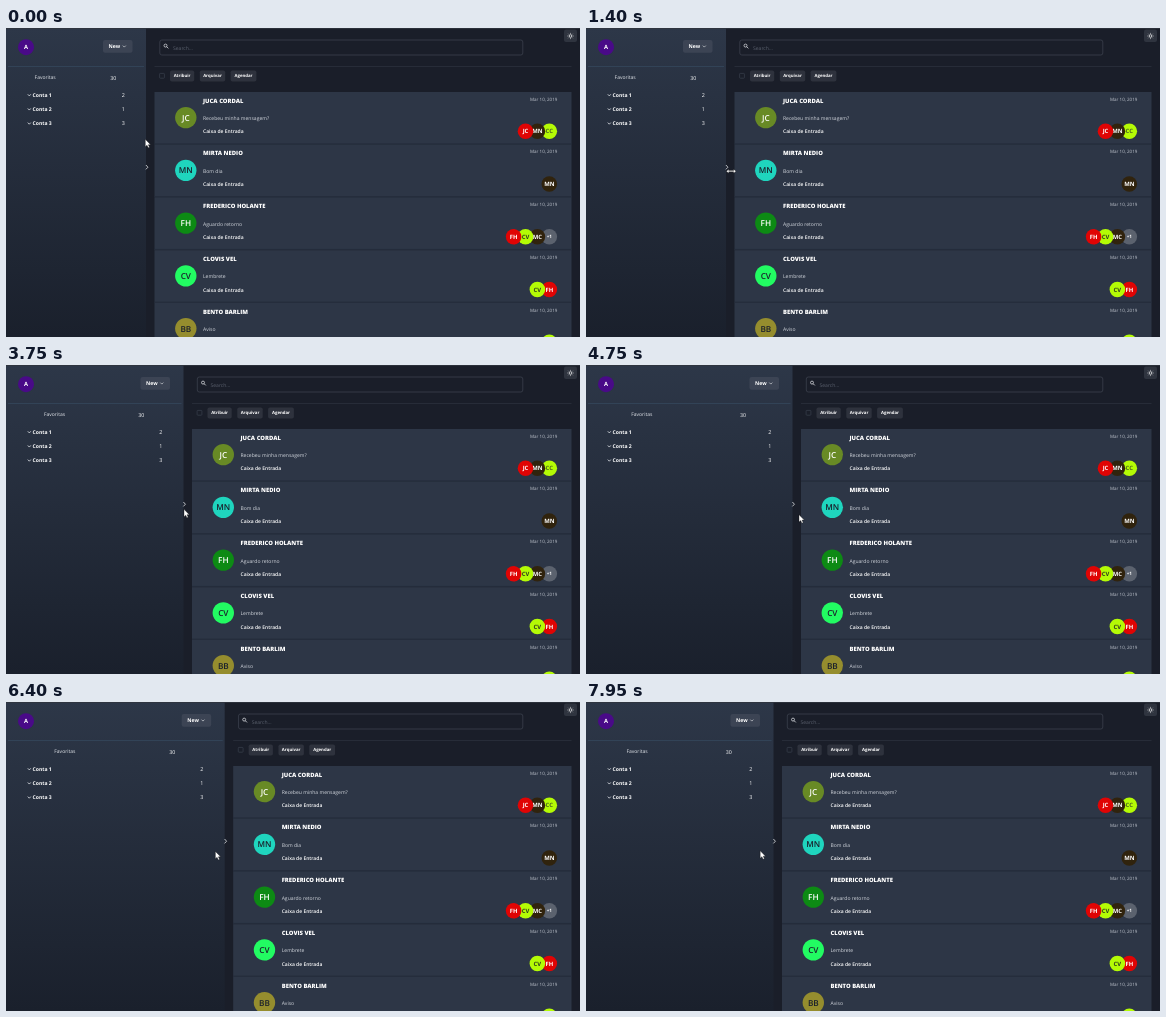
Recreate the animation shown at these times as an HTML page. Size 574 by 309 pixels, loop 8000 ms.

```html
<!DOCTYPE html>
<html lang="pt">
<head>
<meta charset="utf-8">
<title>Caixa de Entrada</title>
<style>
  html, body { margin: 0; width: 100%; height: 100%; overflow: hidden; background: #1a1e29; }
  svg { display: block; width: 574px; height: 309px; }
  text { font-family: "Open Sans", "Noto Sans", sans-serif; text-rendering: geometricPrecision; }
</style>
</head>
<body>
<svg id="stage" viewBox="0 0 574 309" xmlns="http://www.w3.org/2000/svg"></svg>
<script>
const LOOP = 8000, STEP = 50, BASE = 140, PITCH = 52.75;
const stage = document.getElementById('stage');

const text = (x, y, s, size, { weight = 400, fill = '#fff', anchor = 'start' } = {}) =>
  `<text x="${x}" y="${y}" font-size="${size}" font-weight="${weight}" fill="${fill}" text-anchor="${anchor}">${s}</text>`;
const rect = (x, y, w, h, fill, extra = '') =>
  `<rect x="${x}" y="${y}" width="${w}" height="${h}" fill="${fill}" ${extra}/>`;
const stroke = (d, color, width = 0.8) =>
  `<path d="${d}" fill="none" stroke="${color}" stroke-width="${width}"/>`;
const badge = (x, y, r, fill, label, size, weight, ink = '#fff') =>
  `<circle cx="${x}" cy="${y}" r="${r}" fill="${fill}"/>` +
  text(x, y + size * 0.36, label, size, { weight, fill: ink, anchor: 'middle' });
// Moves horizontally by a share of the sidebar's growth.
const slide = (share, body) => `<g data-share="${share}">${body}</g>`;
const button = (x, w, label) =>
  rect(x, 42.5, w, 11, '#2e323d', 'rx="1.8"') +
  text(x + w / 2, 49.4, label, 4.3, { weight: 700, anchor: 'middle' });

const DARK = '#1a202c', RED = '#e00404', LIME = '#b4fb05', BROWN = '#30230d';
const small = {
  JC: [RED, '#fff'], MN: [BROWN, '#fff'], CC: [LIME, '#4c6420'], FH: [RED, '#fff'],
  CV: [LIME, '#2f3a1e'], MC: [BROWN, '#fff'], '+1': ['#5b626e', '#fff']
};
const cards = [
  ['JUCA CORDAL', 'JC', '#688a25', '#fff', 'Recebeu minha mensagem?', ['JC', 'MN', 'CC']],
  ['MIRTA NEDIO', 'MN', '#1fd5be', DARK, 'Bom dia', ['MN']],
  ['FREDERICO HOLANTE', 'FH', '#0d8a14', '#fff', 'Aguardo retorno', ['FH', 'CV', 'MC', '+1']],
  ['CLOVIS VEL', 'CV', '#22fb62', DARK, 'Lembrete', ['CV', 'FH']],
  ['BENTO BARLIM', 'BB', '#958d2e', DARK, 'Aviso', ['CV']]
];

const cardLeft = ([name, initials, color, ink, message], i) => {
  const y = i * PITCH;
  return rect(148.5, 64 + y, 500, PITCH, '#2d3646') +
    rect(148.5, 115.4 + y, 500, 1.2, '#242c3b') +
    badge(179.8, 89.6 + y, 10.7, color, initials, 8.2, 600, ink) +
    text(197, 74.7 + y, name, 5.9, { weight: 800 }) +
    text(197, 92.1 + y, message, 5.05, { fill: '#d3d7de' }) +
    text(197, 105.3 + y, 'Caixa de Entrada', 5, { weight: 600 });
};
const cardRight = ([, , , , , people], i) => {
  const y = i * PITCH;
  const group = people.map((p, k) => {
    const [color, ink] = small[p];
    return badge(543.3 - 11.9 * (people.length - 1 - k), 103.2 + y, 7.8, color, p, p === '+1' ? 4.6 : 5.9, 700, ink);
  });
  return text(551.3, 72.6 + y, 'Mar 10, 2019', 4.5, { fill: '#c3c8d1', anchor: 'end' }) +
    group.reverse().join('');
};
const account = i => {
  const y = 67.1 + i * 14.15;
  return stroke(`M21.8 ${y - 0.8}l1.5 1.6l1.5-1.6`, '#e8ebef') +
    text(26.5, y + 1.9, `Conta ${i + 1}`, 5.1, { weight: 700 }) +
    slide(1, text(117.2, y + 2, [2, 1, 3][i], 5.4, { anchor: 'middle' }));
};
const rays = Array.from({ length: 8 }, (_, i) => {
  const c = Math.cos(i * Math.PI / 4), s = Math.sin(i * Math.PI / 4);
  return `M${564.5 + 2.2 * c} ${8 + 2.2 * s}L${564.5 + 3.1 * c} ${8 + 3.1 * s}`;
}).join('');

stage.innerHTML = `
  <defs>
    <linearGradient id="side" x2="0" y2="1">
      <stop stop-color="#2d3748"/><stop offset="1" stop-color="#1a202c"/>
    </linearGradient>
    <clipPath id="list"><rect width="565.5" height="309"/></clipPath>
  </defs>` +
  rect(0, 0, BASE, 309, 'url(#side)', 'data-left="0"') +
  rect(2, 38, BASE - 4, 0.9, '#34465a', 'data-left="2"') +
  rect(0, 0, 574, 0.8, '#30353f') +
  badge(20, 19.2, 8, '#490a88', 'A', 5.8, 700) +
  slide(1,
    rect(97, 12, 29.5, 12.8, '#3c4454', 'rx="2"') +
    text(102.6, 20.2, 'New', 5.2, { weight: 700 }) +
    stroke('M116.8 17.6l1.5 1.5l1.5-1.5', '#d8dbe0', 0.7)) +
  slide(0.25, text(28.6, 51.4, 'Favoritas', 5, { fill: '#e6e9ee' })) +
  slide(0.75, text(107.2, 51.5, '30', 5.3, { anchor: 'middle' })) +
  [0, 1, 2].map(account).join('') +
  rect(153.8, 12, 363, 15, 'none', 'rx="2" stroke="#3b414d" stroke-width="0.8" data-right="516.8"') +
  rect(148.5, 38, 417, 0.8, '#2b303c', 'data-right="565.5"') +
  slide(1,
    '<circle cx="159.5" cy="17.6" r="1.5" fill="none" stroke="#e8eaee" stroke-width="0.7"/>' +
    stroke('M160.6 18.7l1.7 1.7', '#e8eaee') +
    text(167, 21.8, 'Search...', 5.05, { fill: '#5a606d' }) +
    rect(153.6, 45.4, 4.8, 4.8, 'none', 'rx="0.7" stroke="#3a414e" stroke-width="0.7"') +
    button(164, 24.2, 'Atribuir') + button(193.8, 25.4, 'Arquivar') + button(224.6, 25.8, 'Agendar')) +
  `<g clip-path="url(#list)">${slide(1, cards.map(cardLeft).join(''))}</g>` +
  cards.map(cardRight).join('') +
  slide(1, stroke('M139.9 137l2 2.2l-2 2.2', '#e4e7ec')) +
  rect(558, 1.5, 13, 12.5, '#2f343f', 'rx="2"') +
  '<circle cx="564.5" cy="8" r="1.3" fill="none" stroke="#fff" stroke-width="0.7"/>' +
  stroke(rays, '#fff', 0.6) +
  `<path id="arrow" d="M0 0v7.4l1.7-1.5l1.2 2.6l1.3-.6l-1.2-2.5h2.3z" fill="#fff" stroke="#111" stroke-width=".35"/>
   <path id="resize" d="M-4.8 0l2.3-2v1.4h5v-1.4l2.3 2l-2.3 2v-1.4h-5v1.4z" fill="#fff" stroke="#111" stroke-width=".3"/>`;

// Each row: time, value(s).
const widthTrack = [
  [2400, 140], [3250, 146], [3750, 177.5], [4150, 192], [4750, 206.5], [5000, 213],
  [5550, 227.5], [5850, 230], [6700, 212.5], [7100, 203.5], [7550, 192], [7950, 187.5]
];
const pointerTrack = [
  [0, 139.3, 111.3], [150, 139.8, 115], [550, 139.8, 115], [1400, 145.2, 143.2],
  [1750, 145.2, 143.2], [1800, 144.6, 143.2], [1900, 144.6, 143.2], [1950, 145.2, 143.2],
  [2400, 145.2, 143.2], [3250, 150, 143.5], [3750, 178, 144.3], [4150, 197, 147],
  [4750, 213, 149.7], [5200, 226, 150], [5550, 225, 149.7], [6300, 212, 149.5],
  [7100, 191, 148.8], [7950, 174.2, 148.8]
];
function sample(track, t) {
  const next = track.findIndex(row => row[0] > t);
  if (next === 0) return track[0].slice(1);
  if (next < 0) return track[track.length - 1].slice(1);
  const a = track[next - 1], b = track[next], p = (t - a[0]) / (b[0] - a[0]);
  return a.slice(1).map((v, i) => v + (b[i + 1] - v) * p);
}

const sliders = [...stage.querySelectorAll('[data-share]')];
const panels = [...stage.querySelectorAll('[data-left]')];
const fields = [...stage.querySelectorAll('[data-right]')].map(el => ({ el, left: +el.getAttribute('x') }));
const arrow = document.getElementById('arrow'), resize = document.getElementById('resize');

function draw(now) {
  const t = Math.floor((now % LOOP) / STEP) * STEP;
  const [width] = sample(widthTrack, t), growth = width - BASE;
  for (const el of sliders) el.setAttribute('transform', `translate(${growth * el.dataset.share})`);
  for (const el of panels) el.setAttribute('width', width - 2 * el.dataset.left);
  for (const { el, left } of fields) {
    el.setAttribute('x', left + growth);
    el.setAttribute('width', el.dataset.right - left - growth);
  }
  const [x, y] = sample(pointerTrack, t), resizing = t >= 1200 && t < 3300;
  const shown = resizing ? resize : arrow;
  arrow.style.display = resizing ? 'none' : '';
  resize.style.display = resizing ? '' : 'none';
  shown.setAttribute('transform', `translate(${x} ${y})`);
}
const start = performance.now();
function tick() {
  draw(performance.now() - start);
  requestAnimationFrame(tick);
}
tick();
</script>
</body>
</html>
```
